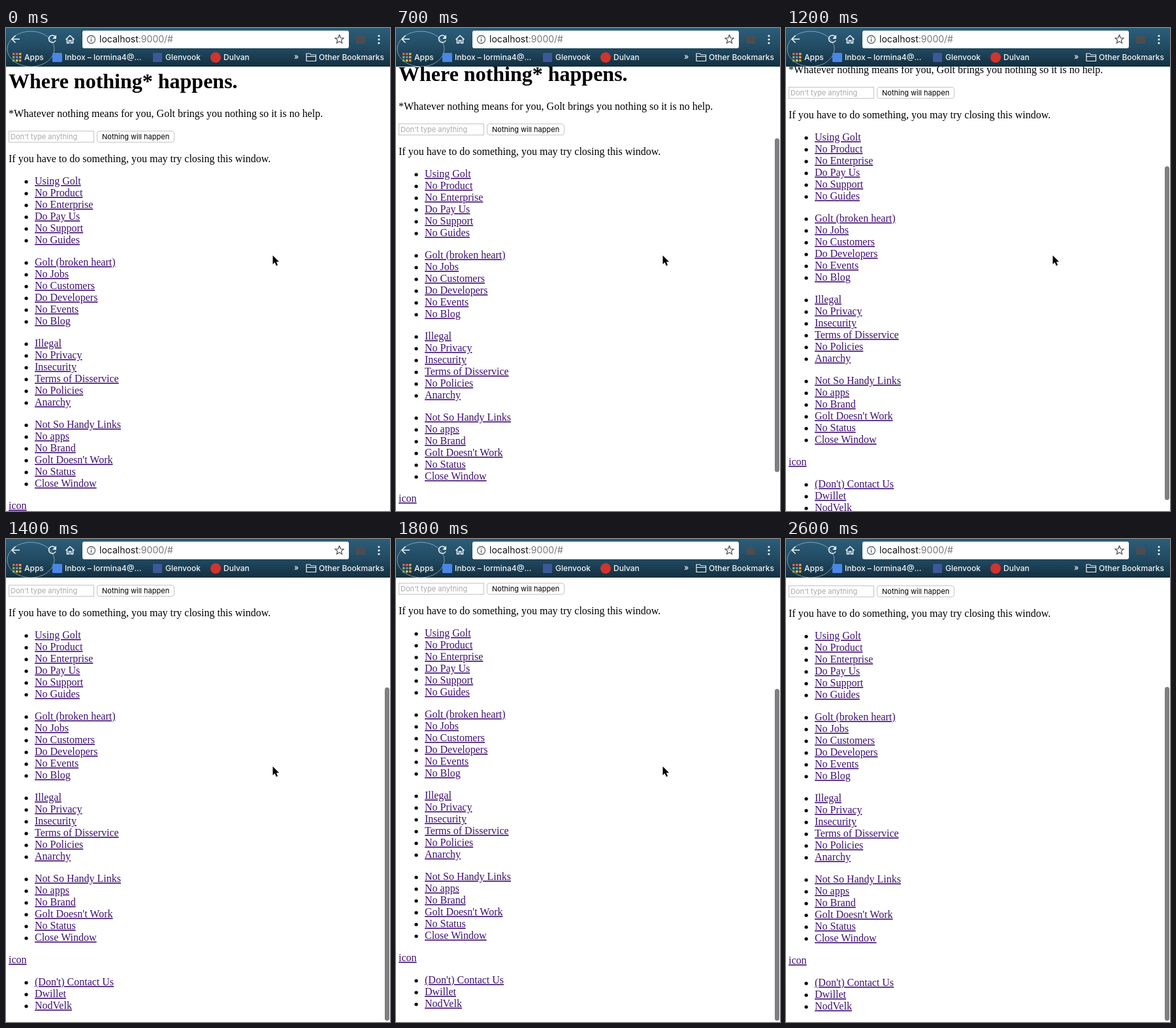
These frames come from a looping animation (588x738 px, 2.7 s). An HTML page:

```html
<!DOCTYPE html>
<html lang="en">
<head>
<meta charset="utf-8">
<title>Where nothing happens</title>
<style>
  html, body { margin: 0; width: 588px; height: 738px; overflow: hidden; background: #fff; }
  svg { display: block; }
  text { white-space: pre; }
  #page { font: 16px "Liberation Serif", Times, serif; }
  #page .h1 { font-size: 32px; font-weight: bold; }
  #page .ui { font: 11px Inter, sans-serif; }
  .link { fill: #3f0f73; text-decoration: underline 1px; text-decoration-skip-ink: none; }
  #bar text { font: 500 12px Inter, sans-serif; fill: #f1f5f7; }
  #bar .url { font-weight: 400; font-size: 14px; fill: #111; }
  .icon { fill: none; stroke: #eef3f6; stroke-width: 1.6; }
</style>
</head>
<body>
<svg width="588" height="738" viewBox="0 0 588 738">
  <defs>
    <linearGradient id="sky" x2="0" y2="1">
      <stop offset="0" stop-color="#2b5d79"/>
      <stop offset=".5" stop-color="#224b63"/>
      <stop offset="1" stop-color="#132f40"/>
    </linearGradient>
  </defs>

  <g id="page">
    <text class="h1" x="4" y="92">Where nothing* happens.</text>
    <text x="4" y="136">*Whatever nothing means for you, Golt brings you nothing so it is no help.</text>
    <rect x="4.5" y="157.5" width="130" height="17" fill="#fff" stroke="#c4c4c4"/>
    <text class="ui" x="7" y="170" fill="#a9a9a9">Don't type anything</text>
    <rect x="139.5" y="157.5" width="118" height="17" rx="3.5" fill="#fff" stroke="#c6c6c6"/>
    <text class="ui" x="147" y="170">Nothing will happen</text>
    <text x="4" y="205">If you have to do something, you may try closing this window.</text>
    <text class="link" x="4" y="735">icon</text>
  </g>

  <rect id="thumb" x="580" width="7" rx="3.5" fill="#7f7f7f"/>

  <g id="bar">
    <rect width="588" height="59" fill="url(#sky)"/>
    <ellipse cx="38" cy="32" rx="36" ry="27" fill="none" stroke="#a9c0cc" opacity=".7"/>
    <path class="icon" d="M21 17H9M14.5 11.5L9 17l5.500 5.500"/>
    <path class="icon" d="M75.5 13.5A5.5 5.5 0 1 0 76 19"/>
    <path d="M77 10.5v6h-6z" fill="#eef3f6"/>
    <path class="icon" d="M91.5 17.5L98 11.5l6.5 6M93.5 16.5v6.5h3v-4h3v4h3v-6.5"/>
    <rect x="117" y="4" width="408" height="27" rx="3" fill="#fff"/>
    <circle class="icon" cx="130.5" cy="17.5" r="6" style="stroke:#5f6368;stroke-width:1.3"/>
    <path d="M130.5 14v1.5M130.5 16.7v4" stroke="#5f6368" stroke-width="1.5"/>
    <text class="url" x="143" y="22">localhost<tspan fill="#777">:9000/#</tspan></text>
    <path id="star" fill="none" stroke="#5a5a5a" stroke-width="1.3" stroke-linejoin="round"/>
    <rect x="536" y="12" width="14" height="12" rx="1" fill="#4b4d52"/>
    <g fill="#eef3f6">
      <circle cx="571" cy="12" r="1.6"/><circle cx="571" cy="17.5" r="1.6"/><circle cx="571" cy="23" r="1.6"/>
    </g>
    <g id="apps"></g>
    <text x="28" y="49">Apps</text>
    <rect x="71" y="38" width="15" height="14" rx="1.5" fill="#4a86e8"/>
    <text x="90" y="49">Inbox – lormina4@...</text>
    <rect x="225" y="38" width="14" height="14" rx="1" fill="#3b5998"/>
    <text x="244" y="49">Glenvook</text>
    <circle cx="321" cy="45" r="8" fill="#d0342c"/>
    <text x="333" y="49">Dulvan</text>
    <text x="441" y="48">»</text>
    <path class="icon" style="stroke-width:1.2" d="M460 50.5V39h5.5l1.5 2h7.5v9.500zM460 43.5h14.5"/>
    <text x="479" y="49">Other Bookmarks</text>
  </g>

  <path id="cursor" d="M408.5 347.5v13.5l3.1-2.900 2.200 5.100 2.300-1-2.200-4.900h4.300z"
        fill="#000" stroke="#fff" paint-order="stroke"/>
</svg>

<script>
const $ = id => document.getElementById(id);

function add(parent, tag, attrs, label = '') {
  const el = document.createElementNS('http://www.w3.org/2000/svg', tag);
  for (const key in attrs) el.setAttribute(key, attrs[key]);
  el.textContent = label;
  parent.append(el);
}

// First baseline of each list, then its links
const lists = [
  [239, 'Using Golt', 'No Product', 'No Enterprise', 'Do Pay Us', 'No Support', 'No Guides'],
  [363, 'Golt (broken heart)', 'No Jobs', 'No Customers', 'Do Developers', 'No Events', 'No Blog'],
  [487, 'Illegal', 'No Privacy', 'Insecurity', 'Terms of Disservice', 'No Policies', 'Anarchy'],
  [611, 'Not So Handy Links', 'No apps', 'No Brand', "Golt Doesn't Work", 'No Status', 'Close Window'],
  [769, "(Don't) Contact Us", 'Dwillet', 'NodVelk']
];
for (const [top, ...links] of lists) {
  links.forEach((label, i) => {
    const y = top + i * 18;
    add($('page'), 'circle', { cx: 31, cy: y - 4, r: 2.6 });
    add($('page'), 'text', { class: 'link', x: 44, y }, label);
  });
}

const tints = ['#e2604f', '#e2604f', '#e8a33d', '#7fb45c', '#5b93d6', '#e8a33d', '#7fb45c', '#e8c13d', '#e8a33d'];
tints.forEach((fill, i) => add($('apps'), 'rect', {
  x: 10 + i % 3 * 5, y: 38 + Math.floor(i / 3) * 5, width: 3.4, height: 3.4, fill
}));

const points = Array.from({ length: 10 }, (_, i) => {
  const r = i % 2 ? 3 : 7.2, a = i * Math.PI / 5;
  return `${510.5 + r * Math.sin(a)} ${17.5 - r * Math.cos(a)}`;
});
$('star').setAttribute('d', `M${points.join('L')}Z`);

// Scroll offset per 100 ms step, with a rubber-band bounce past the end
const STEP = 100;
const scroll = [0, 0, 0, 0, 1, 3, 6, 11, 20, 30, 42, 55, 67, 78, 87, 91, 92, 91, 90, 89, 88, 88, 87, 87, 87, 86, 86];
const CURSOR_STEPS = 25;

function draw() {
  const i = Math.floor(performance.now() / STEP) % scroll.length;
  const y = scroll[i];
  const top = 160 + y * 0.766;
  $('page').setAttribute('transform', `translate(0 ${-y})`);
  $('thumb').setAttribute('y', top);
  $('thumb').setAttribute('height', Math.min(510, 736 - top));
  $('thumb').setAttribute('opacity', y > 0 ? 1 : 0);
  $('cursor').setAttribute('opacity', i < CURSOR_STEPS ? 1 : 0);
  requestAnimationFrame(draw);
}
draw();
</script>
</body>
</html>
```
